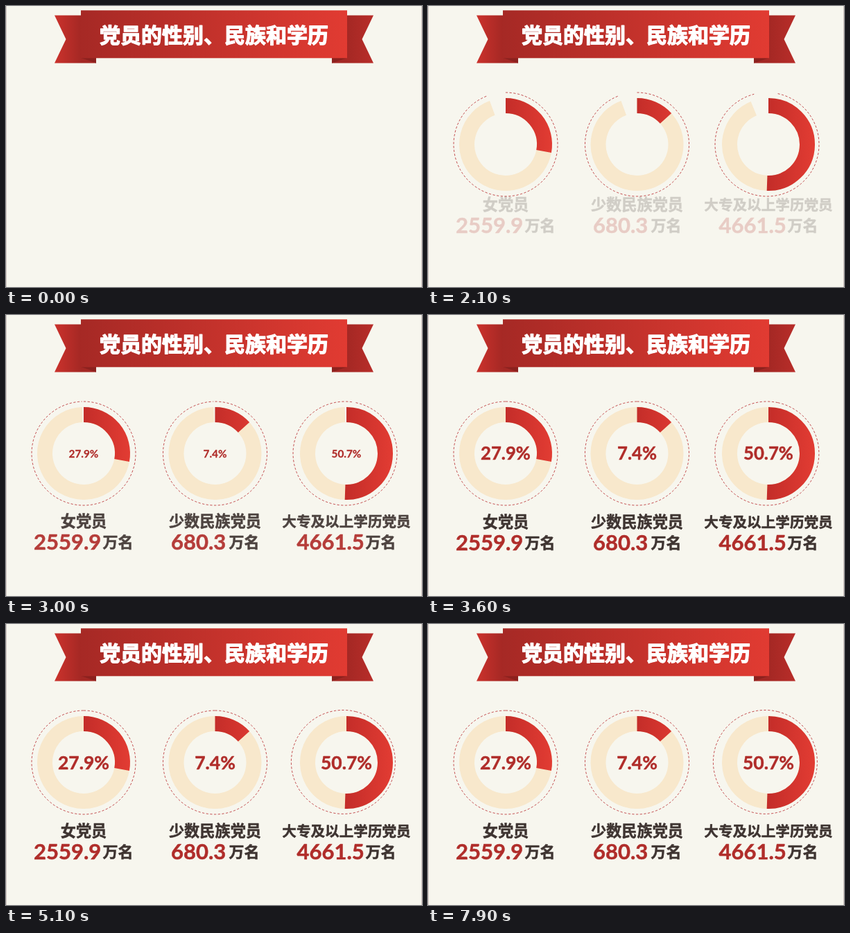
An HTML page for the animation above (8 s loop, 600 by 406 pixels).

```html
<!DOCTYPE html>
<html lang="zh-CN">
<head>
<meta charset="utf-8">
<title>党员的性别、民族和学历</title>
<style>
  html, body { margin: 0; width: 100%; height: 100%; overflow: hidden; background: #f7f6ee; }
  svg { display: block; width: 100vw; height: 100vh; }
  text { font-family: "Noto Sans CJK SC", "Noto Sans CJK", "Noto Sans CJK JP", sans-serif; stroke-linejoin: round; }
  .title { font-size: 30px; font-weight: 900; fill: #fff; stroke: #fff; stroke-width: 1.3px; }
  .label, .unit { font-weight: 700; fill: #3e3431; stroke: #3e3431; stroke-width: .5px; }
  .unit { font-size: 22px; }
  .amount, .percent { font-family: Lato, sans-serif; font-weight: 700; fill: #b02d2a; stroke: #b02d2a; stroke-width: .5px; }
  .amount { font-size: 31px; }
  .percent { font-size: 26.5px; text-anchor: middle; }
  .label { text-anchor: middle; }
</style>
</head>
<body>
<svg id="stage" viewBox="0 0 600 406">
  <defs>
    <linearGradient id="band">
      <stop offset="0" stop-color="#a62925"/>
      <stop offset="1" stop-color="#e13b32"/>
    </linearGradient>
    <linearGradient id="tail">
      <stop offset="0" stop-color="#cb322c"/>
      <stop offset=".65" stop-color="#a42824"/>
    </linearGradient>
    <linearGradient id="tailRight">
      <stop offset=".35" stop-color="#a42824"/>
      <stop offset="1" stop-color="#b82d29"/>
    </linearGradient>
    <linearGradient id="slice" gradientUnits="userSpaceOnUse" x1="0" y1="0" x2="67" y2="0">
      <stop offset="0" stop-color="#c42d29"/>
      <stop offset="1" stop-color="#e23c33"/>
    </linearGradient>
  </defs>
  <rect width="600" height="406" fill="#f7f6ee"/>
  <path d="M.5 0V406M599.5 0V406" stroke="#d3c6c2"/>
  <path d="M70 13.500H130V82.500H70L86.500 48Z" fill="url(#tail)"/>
  <path d="M530 13.500H470V82.500H530L513.500 48Z" fill="url(#tailRight)"/>
  <path d="M108 75H130V82.500ZM492 75H470V82.500Z" fill="#8c211e"/>
  <rect x="108" y="6.300" width="384" height="69" fill="url(#band)"/>
  <text class="title" x="135" y="52.800">党员的性别、民族和学历</text>
</svg>
<script>
const LOOP = 8000;
const RADIUS = 56, RING_WIDTH = 22, DASH_RADIUS = 75;

const charts = [
  { x: 112, slice: 100.4, label: '女党员', size: 22.2, percent: '27.9%',
    amount: '2559.9', amountX: 40, unitX: 139.5 },
  { x: 301.5, slice: 47.8, label: '少数民族党员', size: 22.2, percent: '7.4%',
    amount: '680.3', amountX: 238, unitX: 321.5 },
  { x: 491, slice: 182, label: '大专及以上学历党员', size: 20.6, percent: '50.7%',
    amount: '4661.5', amountX: 419.5, unitX: 518.5, delay: 70,
    dashX: -2, dashStart: 12, dashDelay: 160 },
];

const stage = document.getElementById('stage');

function add(parent, tag, attrs, content = '') {
  const node = document.createElementNS('http://www.w3.org/2000/svg', tag);
  for (const key in attrs) node.setAttribute(key, attrs[key]);
  node.textContent = content;
  return parent.appendChild(node);
}

// Clockwise arc, degrees measured from twelve o'clock.
function arc(radius, from, sweep) {
  if (sweep <= 0) return '';
  sweep = Math.min(sweep, 359.99);
  const point = deg => {
    const a = deg * Math.PI / 180;
    return `${(radius * Math.sin(a)).toFixed(3)} ${(-radius * Math.cos(a)).toFixed(3)}`;
  };
  return `M${point(from)}A${radius} ${radius} 0 ${sweep > 180 ? 1 : 0} 1 ${point(from + sweep)}`;
}

// Quartic ease-out progress of a move.
function ease(time, start, duration) {
  const p = Math.min(1, Math.max(0, (time - start) / duration));
  return 1 - (1 - p) ** 4;
}

for (const c of charts) {
  const ring = add(stage, 'g', { transform: `translate(${c.x} 200)`, fill: 'none' });
  c.dash = add(ring, 'path', { transform: `translate(${c.dashX || 0} 0)`, stroke: '#c24a4c',
    'stroke-dasharray': '3.2 2.5' });
  c.base = add(ring, 'path', { stroke: '#f8e8cc', 'stroke-width': RING_WIDTH });
  c.part = add(ring, 'path', { stroke: 'url(#slice)', 'stroke-width': RING_WIDTH });
  c.value = add(ring, 'text', { class: 'percent', y: 9.7 }, c.percent);

  c.caption = add(stage, 'g', {});
  add(c.caption, 'text', { class: 'label', x: c.x, y: 307, 'font-size': c.size }, c.label);
  add(c.caption, 'text', { class: 'amount', x: c.amountX, y: 340 }, c.amount);
  add(c.caption, 'text', { class: 'unit', x: c.unitX, y: 337 }, '万名');
}

function draw(time) {
  const wipe = 360 * ease(time, 1010, 4050);
  const fall = ease(time, 1980, 2200);
  const grow = ease(time, 2700, 1550);
  for (const c of charts) {
    const sweep = (delay = 20) => 360 * ease(time, delay, 4050);
    c.base.setAttribute('d', arc(RADIUS, 0, sweep(c.delay)));
    c.dash.setAttribute('d', arc(DASH_RADIUS, c.dashStart || 0, sweep(c.dashDelay)));
    c.part.setAttribute('d', arc(RADIUS, 0, Math.min(c.slice, wipe)));
    c.caption.setAttribute('opacity', fall);
    c.caption.setAttribute('transform', `translate(0 ${-15 * (1 - fall)})`);
    c.value.setAttribute('opacity', Math.min(1, grow * 2));
    c.value.setAttribute('transform', `scale(${grow})`);
  }
}

const origin = performance.now();
function tick() {
  draw((performance.now() - origin) % LOOP);
  requestAnimationFrame(tick);
}
tick();
</script>
</body>
</html>
```
